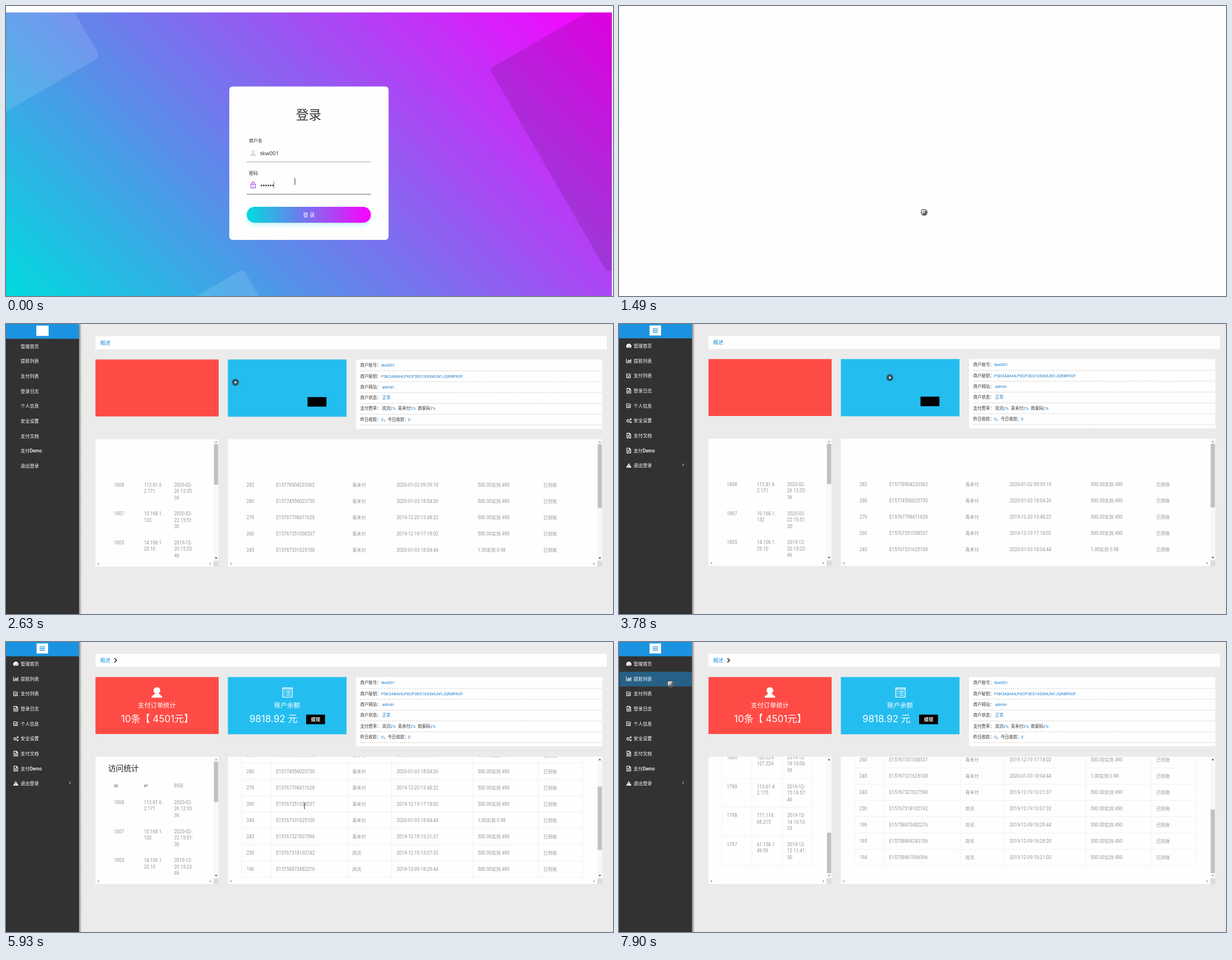
Animation, 1082 px wide and 517 px high, one loop 8000 ms. Source, as an HTML page with a canvas:

```html
<!DOCTYPE html>
<html lang="zh-CN">
<head>
<meta charset="utf-8">
<title>商户后台</title>
<style>
html, body { margin: 0; width: 100%; height: 100%; overflow: hidden; background: #fff; }
canvas { display: block; width: 1082px; height: 517px; }
</style>
</head>
<body>
<canvas id="stage" width="1082" height="517"></canvas>
<script>
const c = document.getElementById('stage').getContext('2d');
const CJK = '"Noto Sans CJK SC", "Noto Sans CJK", sans-serif';
const ROBOTO = 'Roboto, ' + CJK;
const BLUE = '#1c93e1', CYAN = '#00dbde', PINK = '#fc00ff';
const LOOP = 8000, USER = 'tkw001', PAY_A = '青禾付', PAY_B = '岚讯';

// Screen updates come in bursts: [first, last, count]
const bursts = [[0, 0, 1], [270, 1060, 6], [1490, 1490, 1], [1640, 1640, 1], [1870, 2360, 4],
  [2630, 3660, 8], [3780, 4780, 8], [4900, 5930, 8], [6080, 6470, 4], [6750, 6750, 1],
  [6870, 7780, 7], [7900, 7900, 1]];
const ticks = bursts.flatMap(([a, b, n]) =>
  Array.from({ length: n }, (_, i) => n > 1 ? Math.round((a + (b - a) * i / (n - 1)) / 10) * 10 : a));

const pointerPath = [[0, 515, 313], [270, 518, 320], [744, 540, 362], [902, 544, 368], [1640, 544, 368],
  [1870, 535, 345], [2360, 425, 135], [2630, 409, 104], [3660, 470, 96], [4780, 590, 92],
  [5050, 597, 131], [5340, 600, 250], [5600, 560, 290], [6470, 486, 296], [6750, 486, 296],
  [7020, 300, 320], [7480, 290, 315], [7630, 150, 150], [7780, 96, 76], [7900, 92, 75]];
const orderScroll = [[5350, 0], [6470, 163]];
const visitScroll = [[7000, 0], [7500, 389.6]];

function track(keys, t) {
  if (t <= keys[0][0]) return keys[0].slice(1);
  for (let i = 1; i < keys.length; i++) {
    const [a, ...from] = keys[i - 1], [b, ...to] = keys[i];
    if (t <= b) return from.map((v, k) => v + (to[k] - v) * (t - a) / (b - a));
  }
  return keys[keys.length - 1].slice(1);
}

const ICONS = {
  gauge: 'M1 8.5A4.8 4.8 0 1 1 9 8.5ZM4.5 7.5L6.5 3L5.8 7.5Z',
  bars: 'M0 1H1V8H10V9H0ZM2 5H3.5V7H2ZM4 3H5.5V7H4ZM6 4H7.5V7H6ZM8 2H9.5V7H8Z',
  warn: 'M5 .5L10 9H0ZM4.5 3.5V6.2H5.5V3.5ZM4.5 7H5.5V8H4.5Z',
  check: 'M8 5V8.5H1V1.5H7M3 4.5L4.8 6.2L9 2',
  file: 'M1.5 .5H6L8.5 3V9.5H1.5ZM6 .5V3H8.5M3 5H7M3 7H7',
  cogs: 'M5.6 5.5A2.2 2.2 0 1 1 1.2 5.5A2.2 2.2 0 1 1 5.6 5.5M9.6 2.5A1.2 1.2 0 1 1 7.2 2.5A1.2 1.2 0 1 1 9.6 2.5M9.6 8A1.2 1.2 0 1 1 7.2 8A1.2 1.2 0 1 1 9.6 8',
  person: 'M5 1A2 2 0 1 1 4.99 1M1 9V8Q5 5 9 8V9Z',
  lock: 'M1.5 4H8.5V9.5H1.5ZM3 4V2.5A2 2 0 0 1 7 2.5V4M5 6V7.5',
  bust: 'M5 0A2.3 2.7 0 0 1 6.4 5.5L9.5 8Q10 8.6 10 9.6H0Q0 8.6 .5 8L3.6 5.5A2.3 2.7 0 0 1 5 0Z',
  list: 'M.5 .5H9.5V9.5H.5ZM.5 1.7H9.5M2 3.8H3M4 3.8H8M2 5.6H3M4 5.6H8M2 7.5H3M4 7.5H8'
};
const SOLID = ['gauge', 'bars', 'warn', 'bust'];

function rect(x, y, w, h, color) { c.fillStyle = color; c.fillRect(x, y, w, h); }

function round(x, y, w, h, r, fill) {
  c.beginPath(); c.roundRect(x, y, w, h, r);
  c.fillStyle = fill; c.fill();
}

function line(points, color, width = 1) {
  c.beginPath();
  points.forEach(([x, y]) => c.lineTo(x, y));
  c.strokeStyle = color; c.lineWidth = width; c.stroke();
}

function disc(x, y, r, color) {
  c.beginPath(); c.arc(x, y, r, 0, 7);
  c.fillStyle = color; c.fill();
}

function text(str, x, y, size, color, { align = 'left', family = ROBOTO, weight = 400 } = {}) {
  c.font = `${weight} ${size}px ${family}`;
  c.textAlign = align; c.fillStyle = color;
  c.fillText(str, x, y + size * .36);
}

function icon(name, x, y, size, color, width = 1) {
  const shape = new Path2D(ICONS[name]);
  c.save();
  c.translate(x - size / 2, y - size / 2);
  c.scale(size / 10, size / 10);
  c.fillStyle = c.strokeStyle = color; c.lineWidth = width;
  if (SOLID.includes(name)) c.fill(shape, 'evenodd'); else c.stroke(shape);
  c.restore();
}

function ramp(x0, y0, x1, y1, colors) {
  const g = c.createLinearGradient(x0, y0, x1, y1);
  colors.forEach((color, i) => g.addColorStop(i / (colors.length - 1), color));
  return g;
}

// Rounded panel tilted by -30 degrees about one corner
function tilted(x, y, dx, dy, w, h, fill) {
  c.save();
  c.translate(x, y); c.rotate(-Math.PI / 6);
  round(dx, dy, w, h, 9, fill);
  c.restore();
}

function login(t) {
  rect(0, 0, 1082, 517, '#fefefe');
  c.save();
  c.beginPath(); c.rect(0, 11.5, 1080, 506); c.clip();
  rect(0, 11, 1080, 506, ramp(143.75, 660.75, 936.25, -131.75, [CYAN, PINK]));
  tilted(168, 91, -300, -300, 300, 300, 'rgba(255,255,255,.12)');
  tilted(862, 112, 0, 0, 420, 420, 'rgba(0,0,0,.12)');
  tilted(423, 469, -300, 0, 300, 300, 'rgba(255,255,255,.12)');
  c.restore();

  round(398, 143.5, 284, 273.5, 6, '#fefefe');
  text('登录', 539.5, 194, 22.5, '#333', { align: 'center', family: CJK });
  text('商户名', 433, 240, 8, '#333', { family: CJK });
  text('密码', 433, 298, 8, '#333', { family: CJK });
  text(USER, 453, 262, 9.8, '#333', { family: '"Noto Sans", sans-serif' });
  icon('person', 440.5, 262, 10, '#adadad');
  icon('lock', 440.5, 319, 11.5, '#a64bf4');
  line([[429, 278], [650.5, 278]], '#a5a5a5');
  line([[429, 335.5], [650.5, 335.5]], '#666');
  for (let i = 0; i < 6; i++) disc(455.3 + i * 4.1, 320, 1.4, '#333');
  line([[477.5, 313], [477.5, 325]], '#777');

  const slide = track([[580, 0], [1000, 1]], t)[0];
  const left = 429 - 221.5 * (1 - slide);
  c.save();
  c.shadowColor = 'rgba(0,219,222,.22)'; c.shadowBlur = 9; c.shadowOffsetY = 4;
  round(429, 358, 221.5, 28.5, 14.2, ramp(left, 0, left + 664.5, 0, [PINK, CYAN, PINK, CYAN]));
  c.restore();
  text('登 录', 540, 372.5, 9.5, '#fff', { align: 'center', family: CJK });
}

const menu = [['gauge', '管理首页'], ['bars', '提款列表'], ['check', '支付列表'], ['file', '登录日志'],
  ['check', '个人信息'], ['cogs', '安全设置'], ['file', '支付文档'], ['file', '支付Demo'], ['warn', '退出登录']];

function sidebar(t, iconsReady) {
  rect(130, 0, 5, 517, ramp(130, 0, 135, 0, ['#8d847c', '#ebebeb']));
  rect(0, 0, 130, 517, '#323232');
  rect(0, 0, 130, 25.5, BLUE);
  if (iconsReady) {
    rect(54.5, 2.5, 20.5, 18, '#fefefe');
    for (let i = 0; i < 3; i++) rect(60, 8 + i * 3, 9.5, 1.4, BLUE);
  } else rect(54, 2, 22, 18.5, '#fefefe');

  const hover = track([[7700, 0], [7900, .48]], t)[0];
  if (hover) {
    c.globalAlpha = hover;
    rect(1, 53, 129, 26.3, BLUE);
    c.globalAlpha = 1;
  }
  menu.forEach(([name, label], i) => {
    const y = 39 + 26.65 * i;
    if (iconsReady) icon(name, 17.5, y, 9.5, '#fff', 1.2);
    text(label, 26, y, 8.2, '#fff', { weight: 500 });
  });
  if (iconsReady) line([[112.8, 248.8], [115.2, 251.2], [112.8, 253.6]], '#ddd');
}

// Each row alternates [x, text, is value]
const info = [
  [[631.5, '商户账号：'], [668.7, USER, 1]],
  [[631.5, '商户秘钥：'], [668.7, 'PSK3A8AHLP6CP3ES1X63MJN1JQR8R9OF', 1]],
  [[631.5, '商户网站：'], [670.5, 'admin', 1]],
  [[631.5, '商户状态：'], [670.5, '正常', 1]],
  [[631.5, '支付费率：'], [670.5, PAY_B], [685, '2%', 1], [698.5, PAY_A], [720.5, '2%', 1], [734, '商家码'], [756, '2%', 1]],
  [[631.5, '昨日收款：'], [668.7, '0', 1], [673, '，今日收款：'], [716.5, '0', 1]]
];

function cards(fontsReady) {
  rect(159.5, 21, 911.5, 23.5, '#fefefe');
  text('概述', 168, 32.5, 9.1, BLUE);
  rect(159.5, 62.5, 219.5, 101.5, '#ff4b45');
  rect(395.5, 62.5, 211.5, 102, '#24bdf0');
  rect(624, 62.5, 439, 123.5, '#fefefe');
  rect(fontsReady ? 535 : 537.5, 129.5, 33.7, 17, '#000');
  info.forEach((row, i) => {
    const y = 72.8 + 19.3 * i;
    row.forEach(([x, str, value]) => text(str, x, y, 7.45, value ? '#1c7fd0' : '#333'));
    c.setLineDash([2, 1.5]);
    line([[632, y + 10], [1062, y + 10]], '#bbb', .8);
    c.setLineDash([]);
  });
  if (!fontsReady) return;
  const mid = { align: 'center', weight: 300 }, wide = { family: 'Inter, ' + CJK };
  line([[193.3, 29], [197, 32.8], [193.3, 36.6]], '#111', 1.5);
  icon('bust', 269, 90.5, 19, '#fff');
  text('支付订单统计', 269, 112.8, 11.3, '#fff', mid);
  text('10条【 4501元】', 205, 136.5, 17, '#fff', wide);
  icon('list', 501.8, 90, 18.5, '#fff', .75);
  text('账户余额', 501, 112.8, 11.5, '#fff', mid);
  text('9818.92 元', 434, 136.5, 17, '#fff', wide);
  text('提现', 552, 138, 8.2, '#fff', { align: 'center', weight: 700 });
}

const visits = `1808,113.81.6|2.171,2020-02-26 12:35:36
1807,10.168.1.|132,2020-02-22 15:51:30
1805,14.106.1|25.10,2019-12-20 15:23:46
1804,14.106.1|25.10,2019-12-20 13:40:12
1803,113.61.4|2.175,2019-12-19 18:17:25
1802,113.61.4|2.175,2019-12-19 13:05:41
1800,120.229.|127.224,2019-12-19 10:06:59
1799,113.61.4|2.175,2019-12-15 19:57:46
1798,171.118.|68.215,2019-12-14 10:13:33
1797,61.158.1|49.59,2019-12-12 11:41:30`.split('\n').map(row => {
  const [id, ip, when] = row.split(',');
  return [[id], ip.split('|'), [when.slice(0, 8), when.slice(8, 17), when.slice(17)]];
});

const orders = `282,15778904233362,A,2020-01-02 09:39:19
280,15774556023730,A,2020-01-03 18:04:26
279,15767798411628,A,2019-12-20 13:48:22
260,15767351058537,A,2019-12-19 17:18:02
245,15767331625108,A,2020-01-03 18:04:44
243,15767327827598,A,2019-12-19 13:21:37
230,15767318102742,B,2019-12-19 13:07:33
196,15758873482276,B,2019-12-09 18:29:44
195,15758869243156,B,2019-12-09 18:28:20
194,15758867096396,B,2019-12-09 18:21:02`.split('\n').map(row => {
  const [id, code, way, when] = row.split(',');
  const sum = id === '245' ? '1.00实到 0.98' : '500.00实到 490';
  return [id, 'E' + code, way === 'A' ? PAY_A : PAY_B, when, sum, '已到账'].map(s => [s]);
});

const visitTable = { x: 159.5, right: 379, title: '访问统计', titleX: 182, heads: ['ID', 'IP', '时间'],
  edges: [183.5, 237, 291, 345], rows: visits, pitch: 51.6, pad: 14.2, thumb: 72, range: 389.6 };
const orderTable = { x: 395.5, right: 1063, title: '支付订单', titleX: 418,
  heads: ['序号', '订单号', '充值方式', '到账时间', '充值金额', '充值状态'],
  edges: [420, 473, 608.5, 687.5, 832, 949, 1028], rows: orders, pitch: 29, pad: 14.5, thumb: 113.5, range: 163 };

function arrow(x, y, dx, dy, color) {
  c.beginPath();
  c.moveTo(x + dx * 1.6, y + dy * 1.6);
  c.lineTo(x - dx * 1.2 + dy * 2.3, y - dy * 1.2 + dx * 2.3);
  c.lineTo(x - dx * 1.2 - dy * 2.3, y - dy * 1.2 - dx * 2.3);
  c.fillStyle = color; c.fill();
}

function table(tb, scroll, fontsReady) {
  const { x, right, edges, rows, pitch, pad } = tb;
  rect(x, 204.5, right - x, 227, '#fefefe');
  c.save();
  c.beginPath(); c.rect(x, 204.5, right - x - 9, 217); c.clip();
  c.translate(0, -scroll);
  if (scroll > 0) {
    const top = 286 - pad, bottom = top + pitch * rows.length, last = edges[edges.length - 1];
    edges.forEach(e => line([[e, 242], [e, bottom]], '#f1f1f1'));
    line([[edges[0], 242], [last, 242]], '#f1f1f1');
    for (let i = 0; i <= rows.length; i++)
      line([[edges[0], top + pitch * i], [last, top + pitch * i]], '#f1f1f1');
  }
  if (fontsReady) {
    text(tb.title, tb.titleX, 225.5, 13.7, '#222', { weight: 300 });
    tb.heads.forEach((h, k) => text(h, edges[k] + 8.7, 256.5, 8.1, '#8c8c8c', { weight: h < 'a' ? 700 : 400 }));
  }
  rows.forEach((row, i) => row.forEach((cell, k) => cell.forEach((str, n) =>
    text(str, edges[k] + 8.7, 286 + pitch * i + 11.5 * n, 8.15, '#949494'))));
  c.restore();

  const mid = right - 4.5, y = 213.5 + (198.5 - tb.thumb) * scroll / tb.range;
  rect(right - 9, 204.5, 9, 217, '#f8f8f8');
  rect(right - 8.3, y, 7.6, tb.thumb, '#c1c1c1');
  arrow(mid, 209.5, 0, -1, scroll > 0 ? '#505050' : '#a3a3a3');
  arrow(mid, 416.5, 0, 1, scroll < tb.range ? '#505050' : '#a3a3a3');
  arrow(x + 5, 426.5, -1, 0, '#a3a3a3');
  arrow(right - 14.5, 426.5, 1, 0, '#a3a3a3');
  rect(right - 9, 421.5, 9, 10, '#dcdcdc');
}

function dashboard(t) {
  const iconsReady = t >= 3070, fontsReady = t >= 3900;
  rect(0, 0, 1082, 517, '#ebebeb');
  c.save();
  if (!iconsReady) {
    rect(0, 0, 130, 2, BLUE);
    c.translate(0, .8);
  }
  sidebar(t, iconsReady);
  if (!iconsReady) rect(0, -1, 130, 2, BLUE);
  cards(fontsReady);
  table(visitTable, track(visitScroll, t)[0], fontsReady);
  table(orderTable, track(orderScroll, t)[0], fontsReady);
  c.restore();
}

function pointer(t) {
  const [x, y] = track(pointerPath, t);
  const beam = t < 580 || (t > 5400 && t < 7550);
  if (beam) {
    line([[x, y - 6], [x, y + 6]], '#555', 1.3);
  } else if (t < 2000 || t >= 7780) {
    disc(x, y, 6, '#666');
    rect(x - 5.5, y - 5.5, 8, 8, '#555');
    rect(x - 4.5, y - 4.5, 7, 7, '#eee');
    disc(x + .5, y + .5, 3, '#555');
    disc(x, y, 1.4, '#fff');
  } else {
    disc(x, y, 6.2, '#2b5a6c');
    disc(x, y, 1.8, '#fff');
  }
}

function frame(now) {
  const clock = now % LOOP;
  const t = ticks.filter(k => k <= clock).pop();
  if (t < 1490) login(t);
  else if (t < 2630) rect(0, 0, 1082, 517, t < 1640 ? '#fefefe' : '#ebebeb');
  else dashboard(t);
  pointer(t);
  requestAnimationFrame(frame);
}
requestAnimationFrame(frame);
</script>
</body>
</html>
```
